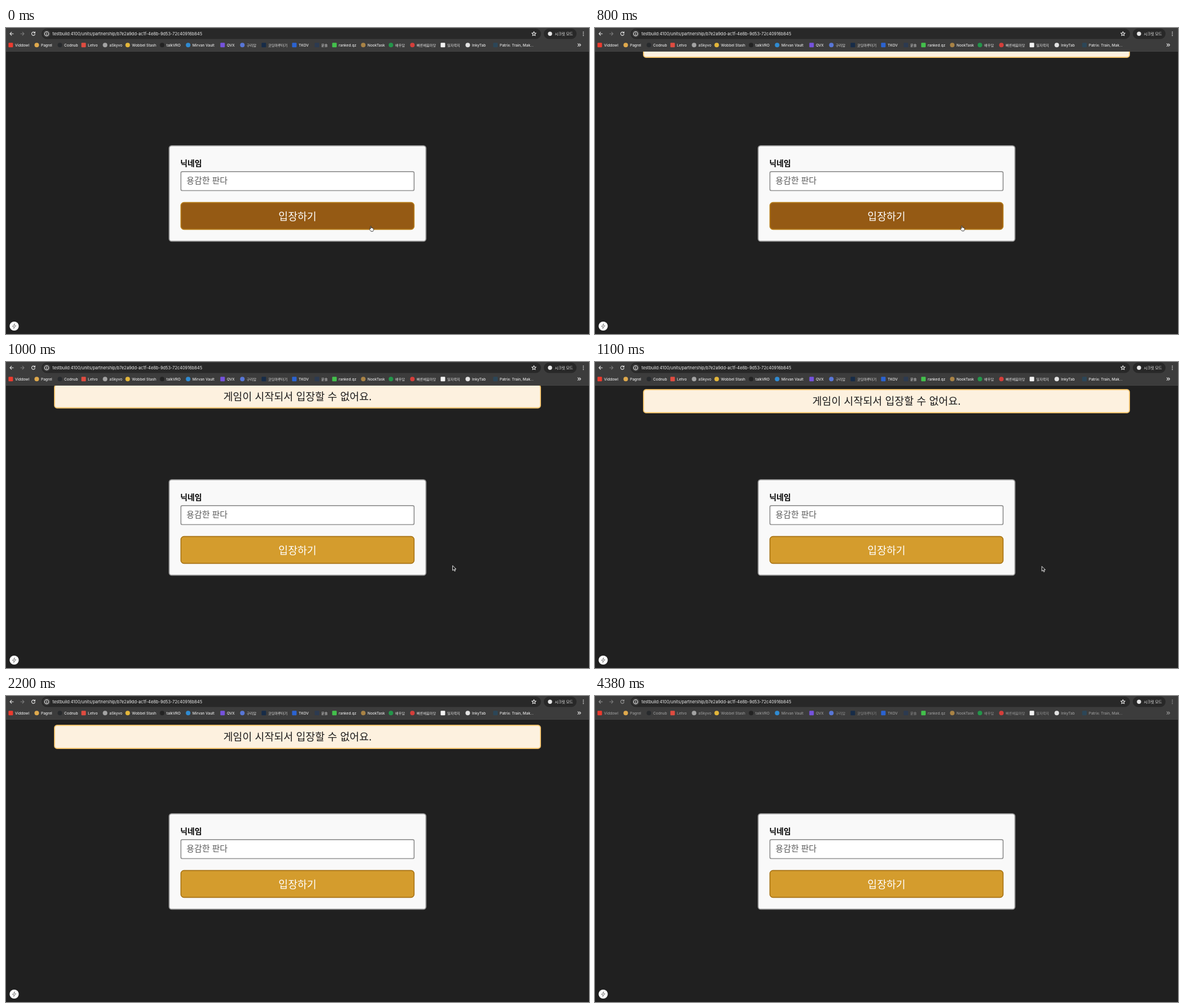
Recreate the animation shown at these times as an HTML page. Size 1032x543 px, loop 4570 ms.

```html
<!DOCTYPE html>
<html lang="ko">
<head>
<meta charset="utf-8">
<title>입장하기</title>
<style>
  html, body { margin: 0; width: 100%; height: 100%; overflow: hidden; background: #202020; }
  svg { display: block; width: 100%; height: 100%; }
  text { font-family: Inter, "Noto Sans CJK KR", "Noto Sans CJK", sans-serif; }
  .ko { font-family: "Noto Sans CJK KR", "Noto Sans CJK", sans-serif; }
  .line { fill: none; stroke: currentColor; stroke-width: 1.1; stroke-linecap: round; stroke-linejoin: round; }
  #chrome { --ink: #e6e6e6; }
  #chrome.inactive { --ink: #989898; }
  .ink { color: var(--ink); fill: var(--ink); }
  .line.ink { fill: none; }
  #bookmarks text { font-size: 6.5px; font-weight: 500; }
  #bookmarks text.ko { font-size: 6.2px; }
</style>
</head>
<body>
<svg viewBox="0 0 1032 543" preserveAspectRatio="none">
  <rect width="1032" height="543" fill="#202020"/>

  <g id="dialog">
    <rect x="288.8" y="208.8" width="454.6" height="169.6" rx="4.5" fill="#f9f9f9" stroke="#929292" stroke-width="1.8"/>
    <text class="ko" x="308.5" y="244.6" font-size="13.8" font-weight="900">닉네임</text>
    <rect x="309.6" y="254.9" width="412.8" height="33.6" rx="2.5" fill="#fff" stroke="#929292" stroke-width="1.7"/>
    <text class="ko" x="319.5" y="276.4" font-size="14.9" fill="#5a5a5a">용감한 판다</text>
    <rect id="button" x="309.6" y="309.6" width="412.8" height="47.8" rx="5.5" stroke-width="1.6"/>
    <text class="ko" x="516" y="340.6" font-size="18.3" font-weight="500" fill="#fff" text-anchor="middle">입장하기</text>
  </g>

  <g id="banner">
    <rect x="85.9" y="52" width="860.2" height="41" rx="4.5" fill="#fdf1df" stroke="#f4c36c" stroke-width="1.8"/>
    <text class="ko" x="516" y="79.2" font-size="18.4" fill="#1c1c1c" text-anchor="middle">게임이 시작되서 입장할 수 없어요.</text>
  </g>

  <g id="chrome">
    <rect width="1032" height="41.5" fill="#3c3c3c"/>
    <rect y="41" width="1032" height=".8" fill="#484848"/>
    <rect x="63" y="1" width="884" height="18.5" rx="9.2" fill="#282828"/>
    <rect x="952" y="1" width="58" height="18.5" rx="9.2" fill="#282828"/>
    <path class="line ink" d="M13 10.2H7.2M9.8 7.4 7 10.2l2.8 2.8"/>
    <path class="line" color="#7c7c7c" d="M26 10.2h5.8M29.2 7.4l2.8 2.8-2.8 2.8"/>
    <path class="line ink" d="M51 8.6a3 3 0 1 0 .3 2.4M51.4 6.8v2.2h-2.2"/>
    <circle cx="72" cy="10.2" r="6.6" fill="#3c3c3c"/>
    <g class="line" color="#e6e6e6" stroke-width="1">
      <circle cx="72" cy="10.2" r="3.7"/>
      <path d="M72 10v1.9M72 8.3v.1"/>
      <path id="star"/>
    </g>
    <text x="82.3" y="12.8" font-size="7.4" fill="#eee">testbuild:4100/units/partnership/b7e2a9dd-ac1f-4e8b-9d53-72c40916b845</text>
    <circle cx="963" cy="10.2" r="3.7" fill="#e6e6e6"/>
    <text class="ko" x="971.5" y="12.8" font-size="6.6" font-weight="500" fill="#eee">시크릿 모드</text>
    <g class="ink">
      <circle cx="1022" cy="7.3" r=".85"/>
      <circle cx="1022" cy="10.3" r=".85"/>
      <circle cx="1022" cy="13.3" r=".85"/>
    </g>
    <path class="line ink" d="M1012.3 28l2.2 2.2-2.2 2.2M1015.2 28l2.2 2.2-2.2 2.2"/>
    <g id="bookmarks"></g>
  </g>

  <circle cx="14.5" cy="529" r="8.1" fill="#fff"/>
  <path d="M15.4 524.8l-4.1 5h3l-.7 3.5 4.2-5h-3z" fill="none" stroke="#555" stroke-width=".7" stroke-linejoin="round"/>

  <path id="hand" fill="#fff" stroke="#111" stroke-width=".8" stroke-linejoin="round"
    d="M2.2 5.6V1.2c0-1 1.4-1 1.4 0v2.6c.6-.6 1.4-.3 1.5.3.6-.4 1.3-.1 1.4.5.7-.2 1.2.1 1.2.8v2c0 1.5-1 1.2-1 2.4H3C2.8 9 .9 7.6.4 6.3c-.3-.9.9-1.6 1.8-.7z"/>
  <path id="arrow" fill="#111" stroke="#fff" stroke-width=".9" stroke-linejoin="round"
    d="M0 0v8.6l2-1.8 1.4 3.1 1.5-.7-1.4-3h2.7z"/>
</svg>

<script>
const $ = id => document.getElementById(id);
const LOOP = 4570;

// text x, label, icon colour, icon is round
const bookmarks = [
  [16, 'Viddowl', '#ec3b2f'], [62, 'Pagrel', '#dfa94c', 1], [103, 'Codnub', '#272a2d', 1],
  [145, 'Letvo', '#df4b40'], [183, 'aSkyvo', '#a3a3a3', 1], [223, 'Wobbel Stash', '#e3b63a', 1],
  [284, 'talkVRO', '#232323', 1], [330, 'Mirvan Vault', '#2f8bd2', 1], [391, 'QVX', '#7552dc'],
  [426, '구리담', '#5876d6', 1], [464, '코딩마루터기', '#172c48'], [518, 'TKOV', '#2b63d0'],
  [558, '문솔', '#2c3a50'], [589, 'ranked.qz', '#43c04b'], [640, 'NookTask', '#a98345', 1],
  [689, '배우담', '#23964a', 1], [727, '빠른배움마당', '#d43e3a', 1], [781, '일자락지', '#f2f2f2'],
  [825, 'InkyTab', '#e2e2e2', 1], [874, 'Patrix: Train, Mak...', '#2c4658']
];
$('bookmarks').innerHTML = bookmarks.map(([x, label, colour, round]) => {
  const korean = /[가-힣]/.test(label);
  return `<rect x="${x - 11.6}" y="26.2" width="8" height="8" rx="${round ? 4 : 1.2}" fill="${colour}"/>
    <text class="ink ${korean ? 'ko' : ''}" x="${x}" y="32.5">${label}</text>`;
}).join('');

const starPoints = Array.from({ length: 10 }, (_, i) => {
  const angle = i * Math.PI / 5 - Math.PI / 2, r = i % 2 ? 1.8 : 4;
  return `${934.5 + r * Math.cos(angle)} ${10.4 + r * Math.sin(angle)}`;
});
$('star').setAttribute('d', `M${starPoints.join('L')}Z`);

// Each row holds from its start time until the next one.
const steps = [
  { at: 0, banner: null, hand: [643, 351] },
  { at: 700, banner: -52, hand: [644, 351] },
  { at: 800, banner: -41, hand: [646.5, 350.3] },
  { at: 900, banner: -27, arrow: [745, 359] },
  { at: 1000, banner: -11.5, arrow: [790.6, 361.3] },
  { at: 1100, banner: -3, arrow: [791, 362.6] },
  { at: 1200, banner: 0, arrow: [791.2, 363] },
  { at: 1900, banner: 0 },
  { at: 3800, banner: null },
  { at: 4380, banner: null, inactive: true }
];

function place(id, point) {
  $(id).style.display = point ? '' : 'none';
  if (point) $(id).setAttribute('transform', `translate(${point})`);
}

function show(step) {
  place('banner', step.banner === null ? null : [0, step.banner]);
  place('hand', step.hand);
  place('arrow', step.arrow);
  $('button').setAttribute('fill', step.hand ? '#955a14' : '#d49c2d');
  $('button').setAttribute('stroke', step.hand ? '#b9801f' : '#a87418');
  $('chrome').classList.toggle('inactive', !!step.inactive);
}

const start = performance.now();
let current;
function tick() {
  const time = (performance.now() - start) % LOOP;
  const step = steps.findLast(s => s.at <= time);
  if (step !== current) show(current = step);
  requestAnimationFrame(tick);
}
tick();
</script>
</body>
</html>
```
